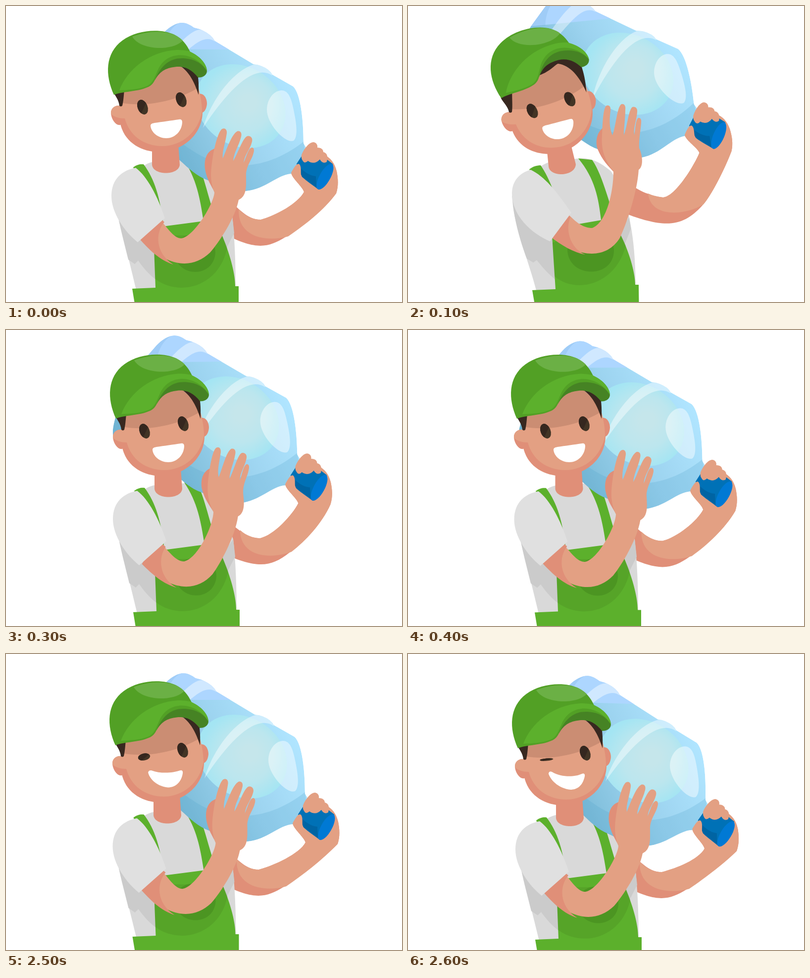
An HTML page with a canvas that plays this animation: 800 by 600 pixels, repeating every 2.7 s.

```html
<!DOCTYPE html>
<html lang="en">
<head>
<meta charset="utf-8">
<title>Water delivery</title>
<style>
  html, body { margin: 0; width: 100%; height: 100%; overflow: hidden; background: #fff; }
  canvas { display: block; }
</style>
</head>
<body>
<canvas id="stage" width="800" height="600"></canvas>
<script>
const ctx = document.getElementById('stage').getContext('2d');
const SKIN = '#e3a083', SKIN_DARK = '#e08f78', GREEN = '#5cb02c', HAIR = '#382820';

// bottle, head, cap: [dx, dy, degrees]; torso: [dx, dy, scaleY]; others: [dx, dy].
// raise bends the arms, lean bends the body, wink closes the left eye.
const rest = { raise: 0, lean: 0, wink: 0, bottle: [0, 0, 0], head: [0, 0, 0], cap: [0, 0, 0],
  torso: [0, 0, 1], neck: [0, 0], arm: [0, 0], elbow: [0, 0], sleeve: [0, 0] };
const jump = { ...rest, raise: 1, lean: 1, bottle: [-26, -68.5, -5.7], head: [-28, 4, -6.6], cap: [-35, -8.5, -9.6] };
const settle = { ...rest, raise: .33, bottle: [-13, -24.5, -.65], head: [4, 0, 0], cap: [4, -.5, 0],
  torso: [2, -1, 1], neck: [5, 0], arm: [0, 5], elbow: [-2, 4], sleeve: [3, -2] };
const dip = { ...rest, wink: .65, bottle: [3, 5, 0], head: [3, 5, 0], cap: [3, 5, 0],
  torso: [.5, 10.3, .982], neck: [3, 5], arm: [2.5, 5], elbow: [-4, 4], sleeve: [2.5, 5] };
const squat = { ...rest, wink: 1, bottle: [1, 14.5, 1.7], head: [4, 11, 0], cap: [4, 11, 0],
  torso: [2, 16.2, .982], neck: [4, 10.5], arm: [4, 11], elbow: [-2, 9], sleeve: [4, 11] };

const lerp = (a, b, k) => a + (b - a) * k;
const between = (p, q) => Object.fromEntries(Object.keys(p).map(key => [key,
  Array.isArray(p[key]) ? p[key].map((v, i) => lerp(v, q[key][i], .5)) : lerp(p[key], q[key], .5)]));

const timeline = [[0, rest], [100, jump], [200, between(jump, settle)], [300, settle],
  [400, between(settle, rest)], [500, rest], [2500, dip], [2600, squat]];

// Blend the numbers of two paths that share their commands.
function mix(a, b, k) {
  const to = b.match(/-?[\d.]+/g);
  let i = 0;
  return a.replace(/-?[\d.]+/g, v => lerp(+v, +to[i++], k).toFixed(2));
}
const warp = (d, m) => d.replace(/(-?[\d.]+) (-?[\d.]+)/g, (_, x, y) => {
  const p = m.transformPoint({ x: +x, y: +y });
  return p.x.toFixed(2) + ' ' + p.y.toFixed(2);
});
const turn = ([dx, dy, deg], cx, cy) => new DOMMatrix().translate(cx + dx, cy + dy).rotate(deg).translate(-cx, -cy);
const shift = ([dx, dy]) => new DOMMatrix().translate(dx, dy);
const fill = (color, d) => { ctx.fillStyle = color; ctx.fill(new Path2D(d)); };
function within(matrix, paint) {
  ctx.save();
  ctx.transform(matrix.a, matrix.b, matrix.c, matrix.d, matrix.e, matrix.f);
  paint();
  ctx.restore();
}
function ellipse(color, x, y, rx, ry, deg) {
  ctx.fillStyle = color;
  ctx.beginPath();
  ctx.ellipse(x, y, rx, ry, deg * Math.PI / 180, 0, 7);
  ctx.fill();
}
function gradient(g, ...colors) {
  colors.forEach((c, i) => g.addColorStop(i / (colors.length - 1), c));
  return g;
}

function backArm(pose, grip) {
  const hand = warp(' 590 400 602 377 C600 367 578 350 576 338 C580 328 585 320 590 320 L645 303 ' +
    'C655 308 664 318 668 335 C671 350 672 365 667 380 C', grip);
  const bend = (a, b) => warp(mix(a, b, pose.raise), shift(pose.elbow));
  fill(SKIN_DARK, bend('M445 385 C475 420 495 434 515 433 C545 425', 'M440 355 C470 378 490 384 515 388 C540 387') + hand +
    bend('642 414 600 447 565 468 C530 490 505 495 445 464Z', '638 335 612 385 595 404 C555 448 520 452 435 419Z'));
  fill(SKIN, bend('M470 412 C485 428 500 433 515 433 C545 425', 'M485 380 C495 385 505 387 515 388 C540 387') + hand +
    bend('642 414 605 443 570 467 C530 478 468 472 470 412Z', '638 335 612 385 597 402 C560 425 490 430 485 380Z'));
}

function torso(pose) {
  const [dx, dy, sy] = pose.torso;
  const lean = (color, a, b) => fill(color, mix(a, b, pose.lean));
  within(new DOMMatrix([1, 0, 0, sy, dx, dy]), () => {
    lean('#d9d9d9',
      'M225 420 L262 345 C268 330 280 320 296 316 L351 312 C375 310 395 322 412 342 C435 375 450 405 457 425 C462 470 464 520 464 580 L264 580 C250 520 237 470 227 430Z',
      'M210 385 L250 345 C255 332 270 322 286 316 L345 309 C365 307 385 313 410 335 C430 365 445 400 447 430 C456 470 460 520 460 580 L260 580 C245 520 215 450 211 395Z');
    lean('#cbcbcb',
      'M227 430 L266 470 L305 470 L305 556 C288 544 277 530 267 516 L260 523 L247 514 C240 485 232 455 227 430Z',
      'M211 385 L260 455 L300 465 L300 556 C284 544 272 530 260 515 L253 520 L240 512 C226 475 212 425 211 385Z');
    lean('#cbcbcb', 'M457 425 L432 460 L446 490 L461 460Z', 'M447 428 L425 460 L437 485 L450 452Z');
    lean(GREEN,
      'M257 327 C265 321 272 320 278 321 C300 350 312 390 318 446 L300 440Z',
      'M245 331 C253 325 260 323 268 323 C280 340 300 380 315 446 L295 440Z');
    lean(GREEN,
      'M316 447 L399 436 C392 390 385 350 358 310 L385 314 C402 345 412 410 437 466 C455 510 463 545 463 568 L470 568 L470 640 L266 640 L255 573 L302 571 L299 490Z',
      'M310 448 L390 434 C385 390 378 350 344 309 L372 312 C395 345 408 410 430 465 C450 505 459 545 459 565 L466 565 L467 640 L262 640 L251 576 L298 574 L291 465Z');
    lean('rgba(30,60,0,.1)',
      'M299 490 L330 465 L436 465 L447 490 C430 570 350 590 301 553Z',
      'M292 480 L330 465 L430 465 L440 485 C420 565 340 585 296 548Z');
    lean('rgba(30,70,0,.16)',
      'M340 500 C340 450 423 450 423 500 C420 552 345 552 340 500Z',
      'M322 495 C322 450 416 450 416 495 C416 553 325 553 322 495Z');
  });
}

const BOTTLE = 'M320 53 C330 42 345 34 355 34 C365 34 373 39 380 44 Q390 46 398 50 Q415 58 422 71 ' +
  'L500 118 Q508 118 515 121 Q533 128 538 139 L580 163 C596 178 601 235 601 278 L608 290 L590 338 L576 340 ' +
  'C548 342 525 371 485 375 C450 373 430 363 407 353 C385 345 370 330 350 312 L260 265 L234 243 ' +
  'Q228 240 229 225 C232 195 255 140 287 90Z';

function bottle() {
  ctx.save();
  ctx.clip(new Path2D(BOTTLE));
  fill(gradient(ctx.createLinearGradient(340, 300, 585, 175), '#7abad6', '#9cd3ef', '#b0e5ff'), BOTTLE);
  fill('#add6ff', 'M200 0 H470 V88 H200Z');
  fill('rgba(110,170,220,.22)', 'M200 0 L350 34 C330 45 320 70 318 90 L200 90Z');
  fill('rgba(80,160,200,.22)', 'M220 90 C270 200 340 270 372 290 C440 338 525 335 601 275 L620 400 L220 400Z');
  const glow = gradient(ctx.createRadialGradient(490, 195, 15, 480, 203, 92), '#c5e6eb', '#bce6ee', '#a4e5f3');
  ellipse(glow, 474, 203, 96, 79, 35);
  fill('rgba(255,255,255,.42)', 'M398 247 C418 180 470 122 506 118 C522 120 535 130 538 141 C505 118 455 160 398 247Z');
  fill('rgba(255,255,255,.42)', 'M325 105 C350 75 375 48 392 48 C406 50 420 62 422 72 C400 56 375 82 345 110Z');
  fill('rgba(255,255,255,.45)', 'M527 210 C527 190 540 172 556 171 C572 171 577 190 582 215 C587 240 590 265 581 273 C565 280 527 240 527 210Z');
  ctx.restore();
}

function lidAndFingers() {
  fill('#0071b6', 'M598 303 L640 305 L660 320 C664 335 645 371 631 372 C620 363 603 352 598 346 L587 320Z');
  fill('#0064a3', 'M587 320 C600 335 612 344 626 345 L627 368 L598 346Z');
  ellipse('#0079d4', 644.5, 346, 11, 29, 29);
  fill(SKIN, 'M597 302 C601 291 612 276 621 276 C628 277 630 283 629 287 C637 287 641 291 641 296 C649 298 651 305 648 316 ' +
    'Q640 321 634 311 Q623 323 610 314 Q603 321 599 313 Q596 309 597 302Z');
  fill(SKIN, 'M576 338 C582 327 588 317 593 321 C598 328 594 338 597 346 L607 356 L603 374 C598 364 580 352 576 338Z');
}

function neck(pose) {
  within(shift(pose.neck), () => fill(SKIN_DARK, mix(
    'M295 280 L295 322 C297 344 349 344 351 322 L348 280Z',
    'M280 285 L284 325 C286 347 337 347 339 321 L329 280Z', pose.lean)));
}

function eye(x, y, wink) {
  const rx = lerp(10, 13.5, wink), ry = lerp(15.5, 2.5, wink), deg = lerp(-22, -5, wink);
  ellipse('#423425', x, y, rx, ry, deg);
  ctx.save();
  ctx.beginPath();
  ctx.moveTo(x + rx, y - ry);
  ctx.lineTo(x - rx * .4, y + ry);
  ctx.lineTo(x - 25, y + 25);
  ctx.lineTo(x - 25, y - 25);
  ctx.clip();
  ellipse('#35271f', x, y, rx, ry, deg);
  ctx.restore();
}

function face(pose) {
  fill(SKIN_DARK, 'M386 180 C398 173 406 186 406 198 C405 210 400 217 392 217Z');
  fill(SKIN_DARK, 'M236 203 C220 198 211 208 212 218 C213 230 222 243 231 241 L245 230Z');
  fill(SKIN_DARK, 'M236 165 C231 200 229 230 232 243 C242 278 275 296 310 296 C360 294 397 258 397 215 C396 195 392 175 385 155 L340 110 L298 125Z');
  fill(SKIN, 'M236 165 L234 203 C220 199 211 208 212 219 C219 225 229 228 240 228 C249 262 278 284 316 284 C355 284 389 255 396 214 C396 195 392 175 385 155 L340 110 L298 125Z');
  fill('#cb8d73', 'M236 165 L231 196 C285 206 345 192 388 166 L385 150 L340 110 L298 125Z');
  fill(HAIR, 'M216 168 L240 162 C238 175 238 190 235 202 Q232 205 229 202 C228 190 220 182 216 172Z');
  fill(HAIR, 'M292 136 C320 132 333 116 339 116 C362 122 378 145 389 180 C390 155 388 140 385 126 C370 95 320 95 292 136Z');
  eye(276, 205 - 2 * pose.wink, pose.wink);
  eye(354, 190, 0);
  fill('#fff', mix(
    'M292 243 C292 239 295 238 300 237 C315 235 335 232 349 230 C354 229 356 231 356 236 C355 255 340 268 324 268 C306 268 293 255 292 243Z',
    'M280 232 C280 228 283 226 287 228 C305 239 332 239 347 232 C351 230 354 232 353 237 C349 256 338 264 324 264 C303 262 285 247 280 232Z', pose.wink));
}

function cap() {
  fill('#468324', 'M301 150 C305 105 332 96 355 98 C380 100 398 115 406 132 C405 142 396 145 388 145 C378 132 365 122 345 123 C326 125 312 130 301 150Z');
  fill('#52a025', 'M218 180 C200 140 200 96 235 70 C265 48 312 45 340 58 C356 66 365 78 372 93 C395 103 406 120 406 132 ' +
    'C396 115 378 106 355 106 C332 106 315 119 303 145 C299 155 294 162 285 165 C265 174 235 173 218 180Z');
  fill('#6bb045', 'M255 62 C264 78 290 86 315 85 C335 84 350 78 357 70 C338 50 298 46 255 62Z');
  fill(GREEN, 'M229 171 C245 128 290 92 345 89 C355 89 365 90 371 92 C395 103 405 120 406 132 C385 95 330 85 308 127 ' +
    'C300 145 296 158 283 163 C267 169 247 170 229 171Z');
}

function frontArm(pose) {
  within(shift(pose.arm), () => {
    const bend = (color, a, b) => fill(color, mix(a, b, pose.raise));
    bend(SKIN_DARK,
      'M425 288 C405 293 400 310 402 330 C405 350 415 365 423 380Z',
      'M395 246 C381 256 378 275 383 290 C392 312 405 325 417 338Z');
    bend(SKIN,
      'M305 425 C330 455 340 471 354 471 C380 468 420 400 421 378 C412 355 413 335 418 305 C422 280 430 252 437 249 C443 246 447 252 446 258 C443 280 436 295 438 309 ' +
      'C446 290 456 260 467 254 C474 252 477 258 475 265 C470 285 460 297 459 314 C468 300 478 268 487 264 C494 262 499 268 497 275 C493 292 482 300 480 318 ' +
      'C486 305 489 290 496 287 C501 286 502 292 500 298 C497 312 484 325 485 345 C485 365 487 385 470 393 C463 430 430 480 412 500 C375 535 325 530 272 472Z',
      'M320 418 C340 440 355 450 372 450 C400 440 415 380 415 335 C396 310 390 290 392 262 C393 240 394 206 401 202 C408 200 410 206 409 213 C407 230 406 245 413 262 ' +
      'C420 245 422 205 431 199 C438 197 440 204 439 210 C439 230 436 245 436 262 C443 245 445 212 453 205 C460 203 464 208 463 215 C462 232 455 245 457 262 ' +
      'C460 250 459 232 465 227 C470 226 472 231 471 237 C470 252 466 270 467 288 C473 300 477 325 466 332 C463 380 440 445 428 470 C400 515 345 510 291 470Z');
    bend(SKIN_DARK,
      'M300 420 L320 438 C302 458 300 500 338 524 C310 515 290 495 268 470Z',
      'M315 415 L328 428 C318 450 325 490 358 504 C335 500 310 485 288 468Z');
  });
  within(shift(pose.sleeve), () => fill('#e0e0e0', mix(
    'M213 385 C213 350 235 333 262 328 C285 345 306 385 321 430 L266 479 C240 458 213 420 213 385Z',
    'M210 380 C210 355 225 338 248 332 C275 345 300 375 330 419 L287 477 C250 462 210 425 210 380Z', pose.lean)));
}

function draw(pose) {
  const grip = turn(pose.bottle, 500, 245);
  ctx.clearRect(0, 0, 800, 600);
  backArm(pose, grip);
  torso(pose);
  within(grip, () => { bottle(); lidAndFingers(); });
  neck(pose);
  within(turn(pose.head, 310, 180), () => face(pose));
  within(turn(pose.cap, 312, 156), cap);
  frontArm(pose);
}

function tick() {
  const t = performance.now() % 2700;
  draw(timeline.findLast(([start]) => t >= start)[1]);
  requestAnimationFrame(tick);
}
tick();
</script>
</body>
</html>
```
